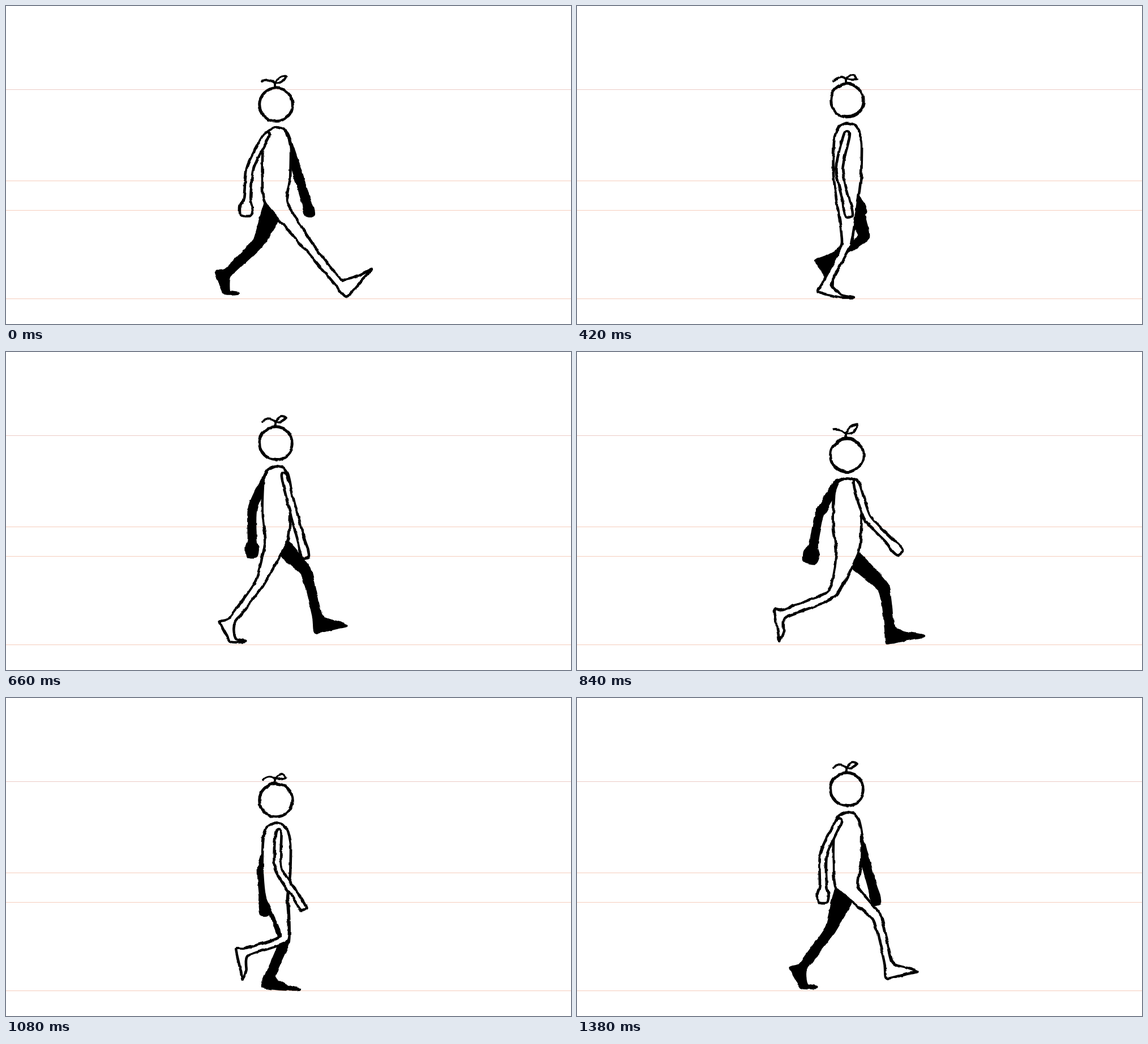
An HTML page for the animation above (1.44 s loop, 998x561 px).

```html
<!DOCTYPE html>
<html lang="en">
<head>
<meta charset="utf-8">
<title>Walk cycle</title>
<style>
  html, body { margin: 0; width: 100%; height: 100%; overflow: hidden; background: #fff; }
  svg { display: block; width: 100vw; height: 100vh; }
  .ink { stroke: #000; stroke-width: 4.6; stroke-linejoin: round; stroke-linecap: round; }
  .near { fill: #fff; }
  .far { fill: #000; }
  .thin { fill: none; stroke-width: 3.8; }
  .guides { mix-blend-mode: multiply; }
</style>
</head>
<body>
<svg viewBox="0 0 998 561">
  <defs>
    <filter id="rough" filterUnits="userSpaceOnUse" x="300" y="60" width="400" height="480" color-interpolation-filters="sRGB">
      <feTurbulence id="noise" type="fractalNoise" baseFrequency="0.07" numOctaves="2" result="n"/>
      <feDisplacementMap in="SourceGraphic" in2="n" scale="5" xChannelSelector="R" yChannelSelector="G"/>
    </filter>
  </defs>
  <rect width="998" height="561" fill="#fff"/>
  <g filter="url(#rough)">
    <path id="farArm" class="ink far"/>
    <path id="farLeg" class="ink far"/>
    <path id="body" class="ink near"/>
    <path id="nearArm" class="ink near"/>
    <circle id="head" class="ink near" r="29.3" style="stroke-width:5"/>
    <path id="sprout" class="ink thin"/>
  </g>
  <g class="guides">
    <path d="M0 147.5H998" stroke="#eccac6"/>
    <path d="M0 308.5H998M0 360.5H998M0 516.5H998" stroke="#f5cdbc"/>
  </g>
</svg>
<script>
const STEP = 60, CYCLE = 24, HALF = 12;
const CENTER = 477, HIP = 173, GROUND = 514;
const $ = id => document.getElementById(id);
const rad = deg => deg * Math.PI / 180;
// Cosine with one period per full cycle, peaking at the given phase
const wave = (phase, peak, harmonic = 1) => Math.cos(rad(15 * harmonic * (phase - peak)));

// Phase; knee from the hip; ankle on the stage; foot pitch in degrees
const legKeys = [
  [0, 61, 82, 586, 486, -47],
  [2, 64, 62, 552, 486, -11],
  [4, 46, 63, 516, 491, -3],
  [8, -15, 84, 424, 483, 30],
  [12, -33, 71, 391, 471, 70],
  [14, -29, 72, 367, 461, 81],
  [16, -15, 74, 391, 450, 104],
  [20, 43, 65, 465, 447, 45],
  [21, 58, 60, 502, 444, 41],
  [23, 52, 54, 550, 467, -12]
];
// Phase; swing in degrees, forward positive
const upperArm = [[0, -27], [4, -28], [9, 0], [12, 18], [16, 12], [20, -14]];
const foreArm = [[0, -6], [4, -11], [8, 18], [12, 17], [14, 43], [16, 42], [20, 20]];

// Smooth cyclic curve through unevenly spaced keys
function curve(keys, phase) {
  const n = keys.length, p = phase % CYCLE;
  const at = j => keys[(j + n) % n][0] + CYCLE * Math.floor(j / n);
  const val = j => keys[(j + n) % n].slice(1);
  let i = n - 1;
  while (keys[i][0] > p) i--;
  const span = at(i + 1) - at(i), u = (p - at(i)) / span;
  const slope = (j, c) => (val(j + 1)[c] - val(j - 1)[c]) / (at(j + 1) - at(j - 1)) * span;
  return val(i).map((a, c) => {
    const b = val(i + 1)[c], m = slope(i, c), k = slope(i + 1, c);
    return a + u * (m + u * (3 * (b - a) - 2 * m - k + u * (2 * (a - b) + m + k)));
  });
}

// Closed curve through points; a larger bend gives rounder corners
function outline(pts, bend) {
  const n = pts.length, at = i => pts[(i + n) % n];
  const handle = (i, s) => at(i).map((v, c) => (v + s * bend * (at(i + 1)[c] - at(i - 1)[c])).toFixed(1));
  return 'M' + pts[0] + pts.map((_, i) => `C${handle(i, 1)} ${handle(i + 1, -1)} ${at(i + 1)}`).join('') + 'Z';
}

// One edge of a limb: front for sign 1, back for sign -1
function edge(chain, half, sign) {
  return chain.map((p, i) => {
    const a = chain[Math.max(i - 1, 0)], b = chain[Math.min(i + 1, chain.length - 1)];
    const dx = b[0] - a[0], dy = b[1] - a[1], r = sign * half[i] / Math.hypot(dx, dy);
    return [p[0] + dy * r, p[1] - dx * r];
  });
}

const headY = phase => 170.2 + 20 * wave(phase, 3.3, 2) + 7 * wave(phase, 0, 4);

// Instep, toe, ball and heel; the toes stay flat while the foot rolls off
function footPoints([x, y], pitch, planted) {
  const c = Math.cos(rad(pitch)), s = Math.sin(rad(pitch));
  const local = (along, down) => [x + along * c - down * s, Math.min(y + along * s + down * c, GROUND)];
  const depth = 25 - pitch * 0.1;
  const ball = local(31, depth), toeLen = planted ? 26 : 16;
  const toe = planted && pitch > 0 ? [ball[0] + toeLen, ball[1]] : local(31 + toeLen, depth);
  return [local(31, depth - 10), toe, ball, local(-9, depth)];
}

function legPoints(phase) {
  const hip = [CENTER + 1, headY(phase) + HIP];
  const [kx, ky, ax, ay, pitch] = curve(legKeys, phase);
  const ankle = [ax, ay], chain = [hip, [hip[0] + kx, hip[1] + ky], ankle], half = [18, 8, 7];
  const front = edge(chain, half, 1).slice(1), back = edge(chain, half, -1).slice(1);
  return [...front, ...footPoints(ankle, pitch, phase % CYCLE < 14), ...back.reverse()];
}

function armPath(phase) {
  const upper = curve(upperArm, phase)[0], fore = curve(foreArm, phase)[0];
  const reach = ([x, y], len, deg) => [x + len * Math.sin(rad(deg)), y + len * Math.cos(rad(deg))];
  const shoulder = [CENTER + 17 * wave(phase, 13), headY(phase) + 55 + 6 * wave(phase, 8.5, 2)];
  const elbow = reach(shoulder, 63, upper), wrist = reach(elbow, 55, fore);
  const palm = reach(wrist, 16, fore), tip = reach(wrist, 31, fore);
  const hand = 8.5 + 2 * wave(phase, 2) + 2 * wave(phase, 2, 2);
  const chain = [shoulder, elbow, wrist, palm, tip], half = [5, 6, 6, hand, hand * 0.75];
  return outline([...edge(chain, half, 1), ...edge(chain, half, -1).reverse()], 0.12);
}

// Two leaves that droop as the head rises
function sproutPath(phase, y) {
  const droop = wave(phase, 8, 2);
  const p = (dx, dy) => `${CENTER + dx} ${y + dy}`;
  const fork = p(-2, -38);
  return `M${p(-2, -30)}L${fork}Q${p(-12, -47)} ${p(-24, -39 + 6 * droop)}` +
    `M${fork}Q${p(8 + 5 * droop, -54)} ${p(18, -45 + 10 * droop)}Q${p(10 - 4 * droop, -36)} ${fork}`;
}

function draw(step) {
  const y = headY(step), far = step + HALF;
  const hipF = [497, y + HIP], hipB = [458, y + HIP + 1];
  const torso = [
    [453, 130], [453, 95], [455, 64], [462, 47], [476, 40], [490, 43], [498, 54], [503, 78], [502, 130]
  ].map(p => [p[0], p[1] + y]);

  $('noise').setAttribute('seed', step % HALF + 1);
  $('head').setAttribute('cx', CENTER);
  $('head').setAttribute('cy', y);
  $('sprout').setAttribute('d', sproutPath(step, y));
  $('body').setAttribute('d', outline([...torso, hipF, ...legPoints(step), hipB], 0.09));
  $('farLeg').setAttribute('d', outline([hipF, ...legPoints(far), hipB], 0.07));
  $('nearArm').setAttribute('d', armPath(step));
  $('farArm').setAttribute('d', armPath(far));
}

const start = performance.now();
let shown = -1;
function tick() {
  const step = Math.floor((performance.now() - start) / STEP) % CYCLE;
  if (step !== shown) draw(shown = step);
  requestAnimationFrame(tick);
}
tick();
</script>
</body>
</html>
```
